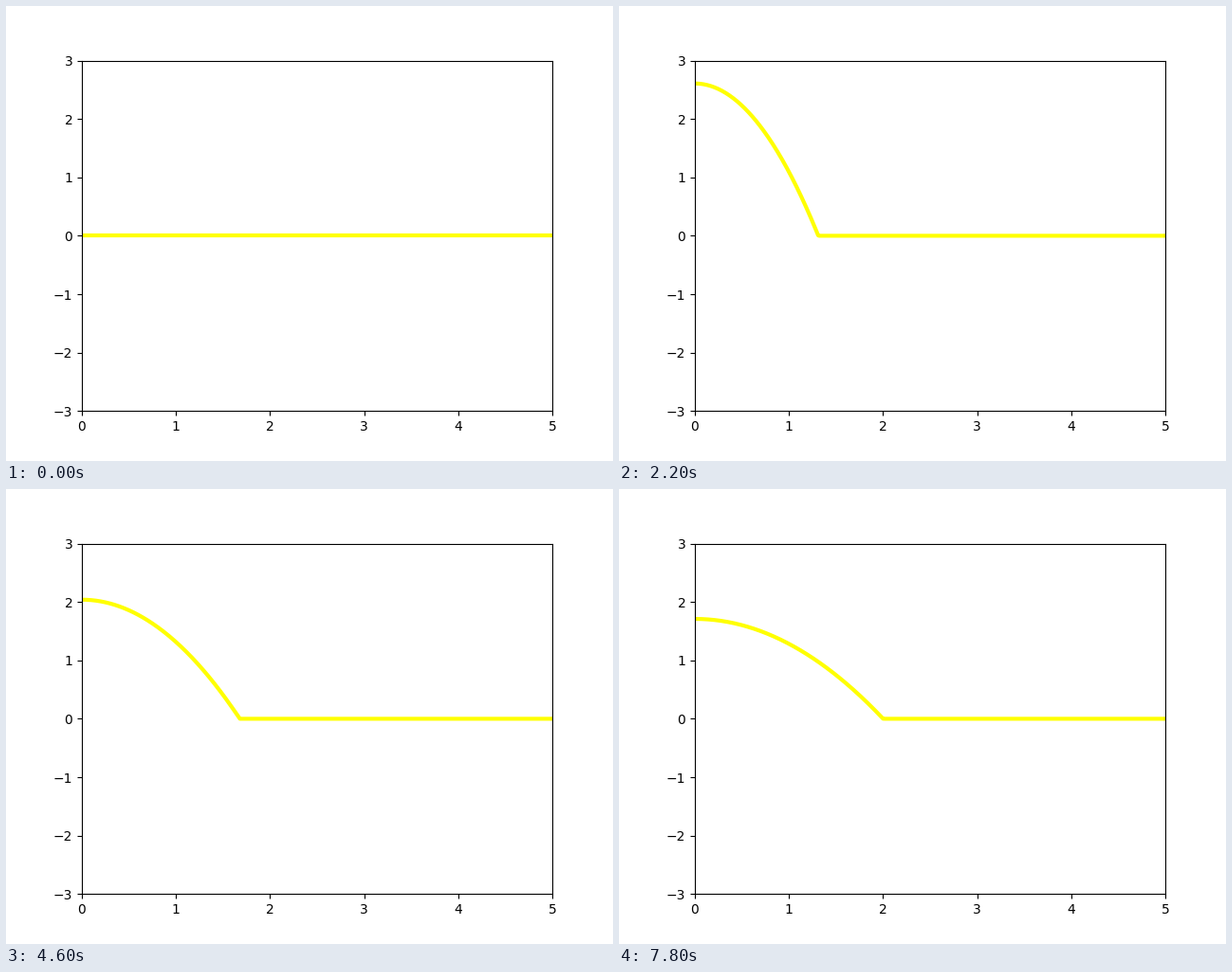
Recreate the animation shown at these times as a matplotlib script. Size 640 by 480 pixels, loop 8000 ms.

```python
import numpy as np
import matplotlib.pyplot as plt
from matplotlib.animation import FuncAnimation

FRAMES = 40
INTERVAL = 200  # ms
PEAK = 5.8      # height of the profile after one step
FRONT = 0.59    # position of the front after one step

x = np.linspace(0, 5, 501)


def profile(step):
    """Self-similar spreading parabola with a sharp front (zero at the start)."""
    if step == 0:
        return np.zeros_like(x)
    scale = step ** (1 / 3)
    return PEAK / scale * np.maximum(1 - (x / (FRONT * scale)) ** 2, 0)


fig, ax = plt.subplots(figsize=(6.4, 4.8), dpi=100)
ax.set_xlim(0, 5)
ax.set_ylim(-3, 3)
line, = ax.plot(x, profile(0), color="#ffff00", lw=3)


def update(step):
    line.set_data(x, profile(step))
    return line,


anim = FuncAnimation(fig, update, frames=FRAMES, interval=INTERVAL,
                     init_func=lambda: update(0), repeat=True, repeat_delay=0)
plt.show()
```
